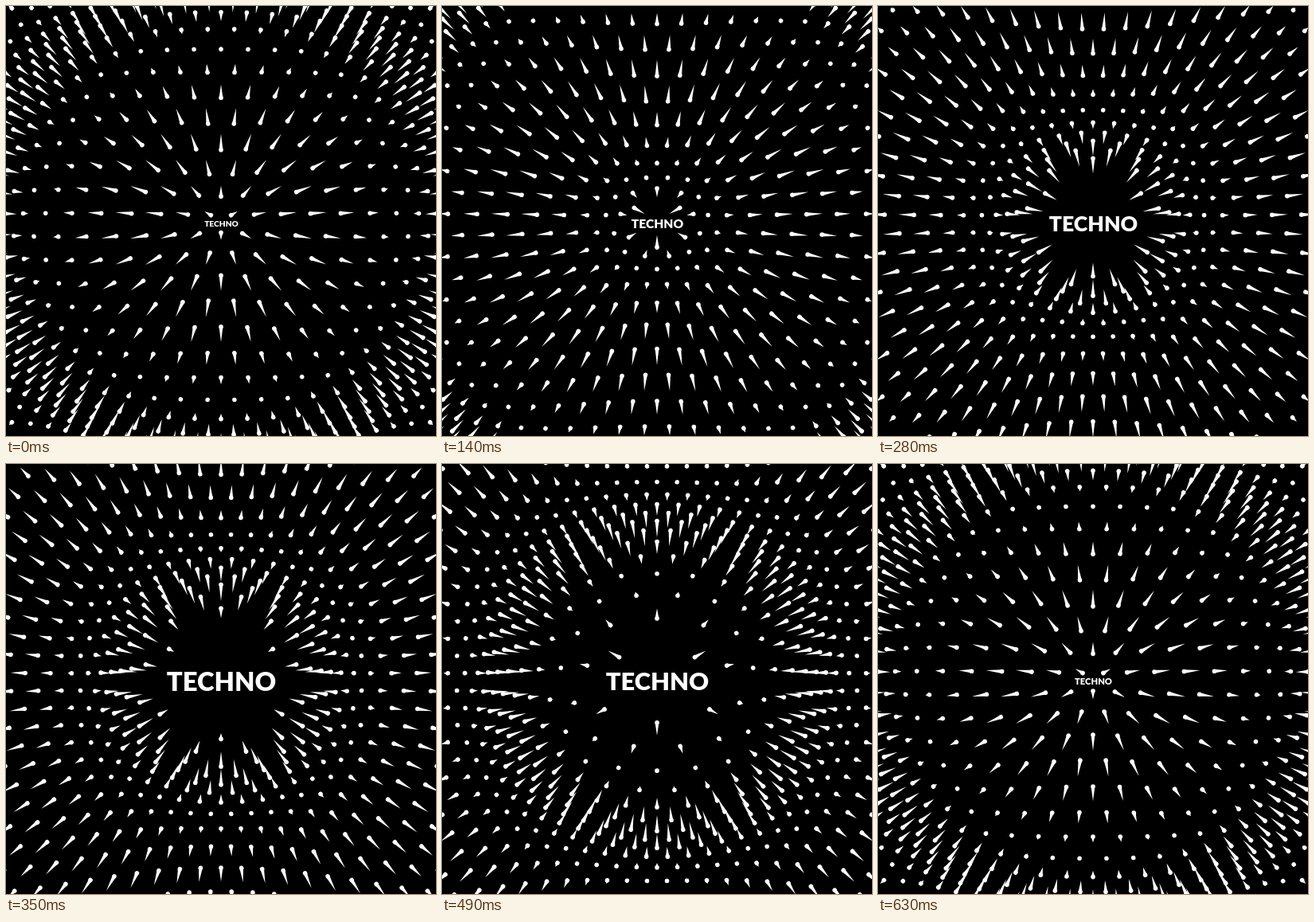
Recreate the animation shown at these times as an HTML page with a canvas. Size 540x540 px, loop 0.7 s.

```html
<!DOCTYPE html>
<html>
<head>
<meta charset="utf-8">
<style>
  html, body { margin: 0; width: 100%; height: 100%; overflow: hidden; background: #000; }
  canvas { display: block; }
</style>
</head>
<body>
<canvas id="stage" width="540" height="540"></canvas>
<script>
const ctx = document.getElementById('stage').getContext('2d');
const STEP = 70, CENTER = 270;
const GAP = 25, ROW = GAP * Math.sqrt(3) / 2;
const PUSH = 61, WAVELENGTH = 362, TRAIL = 40, DOT = 2.8;

// Per step: radius of the wave's trough, and the word's font size
const trough = [8, 45, 82, 121, 159, 194, 228, 267, 328, 366];
const fontSize = [10.2, 11.8, 15.6, 20.6, 26.6, 32.8, 38.9, 30.9, 21, 11.2];

// Triangular lattice centred on the middle of one of its triangles
const dots = [];
for (let j = -19; j <= 19; j++) {
  for (let i = -17; i <= 17; i++) {
    const x = (i + (j & 1 ? 0.5 : 0)) * GAP;
    const y = (j + 2 / 3) * ROW;
    const r = Math.hypot(x, y);
    if (r < 410) dots.push({ r, angle: Math.atan2(y, x) });
  }
}

// Radius of a dot pushed outwards by the travelling wave
function pushed(r, low) {
  return r + PUSH * (1 - Math.cos(2 * Math.PI * (r - low) / WAVELENGTH)) / 2;
}

function drawDot({ r, angle }, low) {
  const head = pushed(r, low), tail = pushed(r, low - TRAIL);
  const base = DOT * 0.85;
  ctx.save();
  ctx.rotate(angle);
  ctx.beginPath();
  ctx.arc(head, 0, DOT, 0, 2 * Math.PI);
  ctx.fill();
  ctx.beginPath();
  ctx.moveTo(head, -base);
  ctx.lineTo(tail, 0);
  ctx.lineTo(head, base);
  ctx.fill();
  ctx.restore();
}

function draw(n) {
  ctx.fillStyle = '#000';
  ctx.fillRect(0, 0, 540, 540);
  ctx.fillStyle = '#fff';
  ctx.save();
  ctx.translate(CENTER, CENTER);
  for (const dot of dots) drawDot(dot, trough[n]);
  ctx.restore();

  const size = fontSize[n];
  ctx.font = `900 ${size}px Lato, sans-serif`;
  ctx.textAlign = 'center';
  ctx.fillText('TECHNO', CENTER + 0.5, 273 + size * 0.36);
}

const start = performance.now();
function tick() {
  draw(Math.floor((performance.now() - start) / STEP) % trough.length);
  requestAnimationFrame(tick);
}
tick();
</script>
</body>
</html>
```
